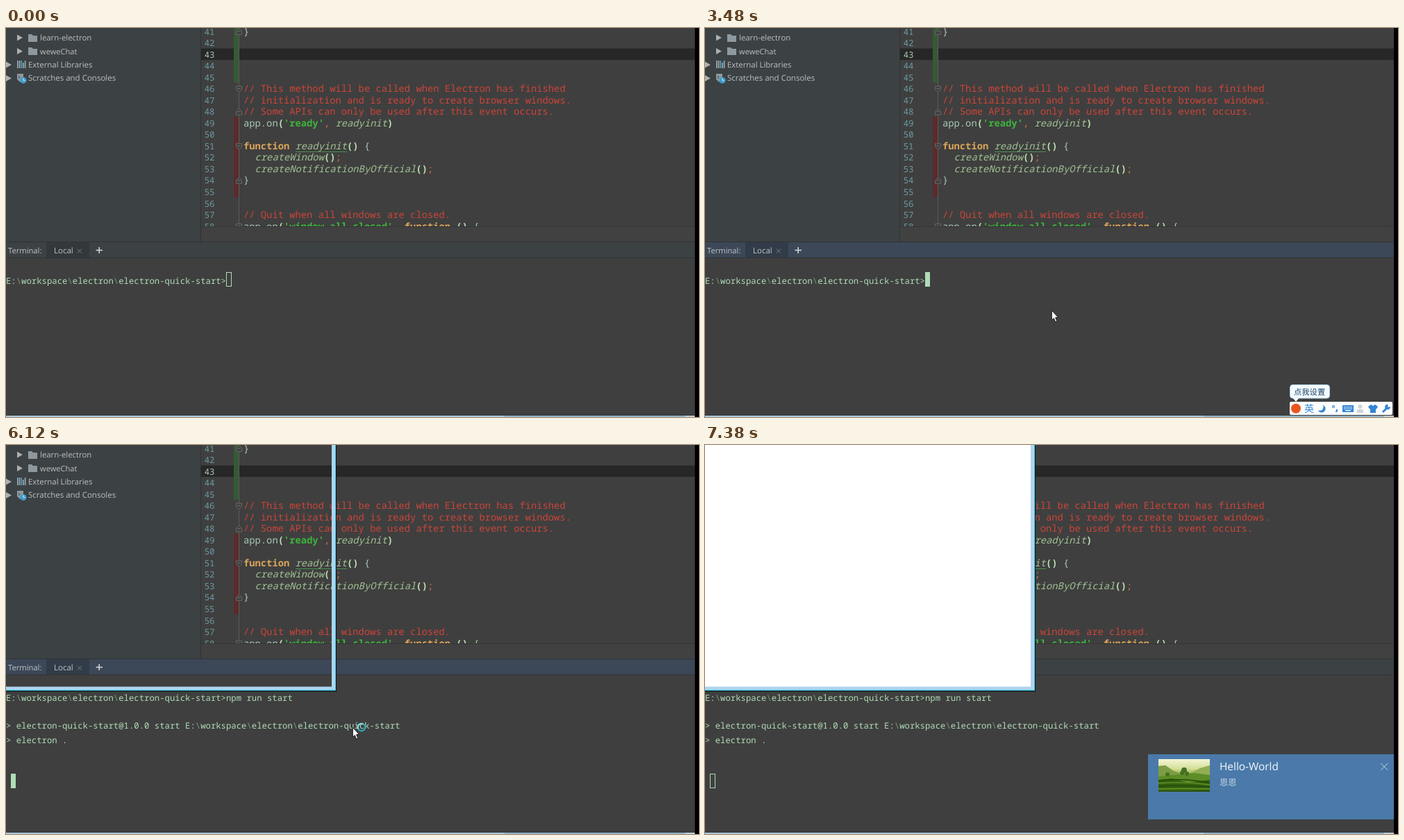
Write an HTML page with a canvas that moves like this. It is 998 by 561 pixels and loops after 8 s.

```html
<!DOCTYPE html>
<html lang="en">
<head>
<meta charset="utf-8">
<title>Editor and terminal</title>
<style>
html, body { margin: 0; width: 100%; height: 100%; overflow: hidden; background: #000; }
canvas { display: block; }
</style>
</head>
<body>
<canvas id="stage" width="998" height="561"></canvas>
<script>
const ctx = document.getElementById('stage').getContext('2d');
ctx.textRendering = 'geometricPrecision';

const LOOP = 8000;
const MONO = '"Noto Sans Mono", "DejaVu Sans Mono", monospace';
const UI = '"Open Sans", "Noto Sans", sans-serif';
const CJK = '"Noto Sans CJK SC", "Noto Sans CJK", sans-serif';
const BG = '#3f3f3f';
const MINT = '#b0dcb6';

const CODE = { adv: 8.28, size: 13.8, x: 342, base: 9.6, row: 16.53 };
const TERM = { adv: 7.372, size: 12.28, top: 352.4, row: 20.3 };

const STYLES = {
  c: ['', '#cc4539'],
  p: ['', '#a9c9b4'],
  b: ['bold', '#bfe3b2'],
  s: ['bold', '#3cb53c'],
  k: ['bold', '#dba55a'],
  i: ['italic', '#a0c293'],
  o: ['', '#cb7441']
};

// Line number -> list of [style, column, text]
const LINES = {
  41: [['p', 0, '}']],
  46: [['c', 0, '// This method will be called when Electron has finished']],
  47: [['c', 0, '// initialization and is ready to create browser windows.']],
  48: [['c', 0, '// Some APIs can only be used after this event occurs.']],
  49: [['p', 0, 'app.on'], ['b', 6, '('], ['s', 7, "'ready'"], ['o', 14, ','], ['i', 16, 'readyinit'], ['b', 25, ')']],
  51: [['k', 0, 'function'], ['i', 9, 'readyinit'], ['b', 18, '()'], ['p', 21, '{']],
  52: [['i', 2, 'createWindow'], ['b', 14, '()'], ['o', 16, ';']],
  53: [['i', 2, 'createNotificationByOfficial'], ['b', 30, '()'], ['o', 32, ';']],
  54: [['p', 0, '}']],
  57: [['c', 0, '// Quit when all windows are closed.']],
  58: [['p', 0, 'app.on'], ['b', 6, '('], ['s', 7, "'window-all-closed'"], ['o', 26, ','], ['k', 28, 'function'], ['b', 37, '()'], ['p', 40, '{']]
};

const PATH = 'E:\\workspace\\electron\\electron-quick-start';
const PROMPT = PATH + '>';

// Time, x, y of the mouse pointer
const POINTER = [
  [1130, 683, 476], [1210, 650, 464], [1290, 619, 454], [1370, 593, 447],
  [1600, 553, 430], [1680, 518, 414], [1760, 499, 407], [7300, 436, 77]
];

// Time, typed command, cursor column, cursor row
const TYPING = [
  [0, '', 43, 0], [2540, 'CLS', 46, 0], [3090, 'cls', 46, 0], [3480, '', 43, 0],
  [3940, 'npm run start', 56, 0], [4720, 'npm run start', 0, 1],
  [5260, 'npm run start', -1, 1], [5730, 'npm run start', 0, 5],
  [5960, 'npm run start', 1, 6]
];

const latest = (list, t) => list.filter(e => e[0] <= t).pop();

function rect(x, y, w, h, color) {
  ctx.fillStyle = color;
  ctx.fillRect(x, y, w, h);
}

function poly(points, color, line) {
  ctx.beginPath();
  points.forEach(([x, y]) => ctx.lineTo(x, y));
  ctx.closePath();
  if (color) { ctx.fillStyle = color; ctx.fill(); }
  if (line) { ctx.strokeStyle = line; ctx.lineWidth = 1; ctx.stroke(); }
}

function disc(x, y, r, color) {
  ctx.fillStyle = color;
  ctx.beginPath();
  ctx.arc(x, y, r, 0, 7);
  ctx.fill();
}

function path(points, color, width = 1) {
  ctx.strokeStyle = color;
  ctx.lineWidth = width;
  ctx.beginPath();
  points.forEach(([x, y], i) => i ? ctx.lineTo(x, y) : ctx.moveTo(x, y));
  ctx.stroke();
}

function cross(x, y, r, color) {
  path([[x - r, y - r], [x + r, y + r]], color);
  path([[x - r, y + r], [x + r, y - r]], color);
}

function label(text, x, y, color, size = 11.4, family = UI) {
  ctx.font = `${size}px ${family}`;
  ctx.fillStyle = color;
  ctx.fillText(text, x, y);
}

function mono(text, x, y, grid, color, style = '') {
  ctx.font = `${style} ${grid.size}px ${MONO}`;
  ctx.fillStyle = color;
  [...text].forEach((ch, i) => {
    ctx.globalAlpha = ch === '\\' ? 0.55 : 1;
    if (ch !== ' ') ctx.fillText(ch, x + i * grid.adv, y);
  });
  ctx.globalAlpha = 1;
}

function folder(x, y) {
  poly([[x, y], [x + 5, y], [x + 7, y + 2], [x + 13, y + 2], [x + 13, y + 11], [x, y + 11]], '#8d999f');
}

function drawSidebar() {
  rect(0, 0, 280, 308, '#3c4143');
  rect(280, 0, 1, 308, '#313335');
  [[16, 14], [16, 33.5], [0, 53], [0, 72.5]].forEach(([x, y]) =>
    poly([[x, y - 4.5], [x + 8, y], [x, y + 4.5]], '#adb0b1'));
  folder(32, 9);
  folder(32, 28);
  ['#9aa7ad', '#9aa7ad', '#47a6c9', '#9aa7ad', '#9aa7ad'].forEach((c, i) =>
    rect(16 + i * 2.7, i === 3 ? 50 : 47, 1.7, i === 3 ? 8 : 11, c));
  poly([[16, 66], [25, 66], [25, 74], [20, 78], [16, 74]], '#8d999f');
  path([[18, 69], [20, 71], [18, 73]], '#3c4143');
  disc(25, 75.5, 4.6, '#3f9dcc');
  path([[25, 72.5], [25, 75.5], [27.5, 75.5]], '#e4f1f7');
  const ink = '#bcc0c1';
  label('learn-electron', 49, 18, ink);
  label('weweChat', 49, 38, ink, 11.1);
  label('External Libraries', 32, 57, ink);
  label('Scratches and Consoles', 32, 76, ink, 11.5);
}

function foldMark(y, down) {
  const s = down ? 1 : -1;
  poly([[331.5, y - 4 * s], [339.5, y - 4 * s], [339.5, y + 1 * s], [335.5, y + 4.5 * s], [331.5, y + 1 * s]], BG, '#686868');
  path([[333.5, y - 0.5], [337.5, y - 0.5]], '#777');
}

function drawEditor() {
  rect(281, 0, 711, 308, BG);
  ctx.save();
  ctx.beginPath();
  ctx.rect(281, 0, 711, 286);
  ctx.clip();
  rect(281, 29.5, 711, 16.5, '#272727');
  rect(328, 0, 7, 79, '#355a35');
  rect(328, 128, 7, 116, '#5c2a2a');
  rect(335, 0, 1, 286, '#5b5b5b');
  [[41, 0], [46, 1], [48, 0], [51, 1], [54, 0], [58, 1]].forEach(([n, down]) =>
    foldMark(5.4 + (n - 41) * CODE.row, down));
  for (let n = 41; n <= 58; n++) {
    const y = CODE.base + (n - 41) * CODE.row;
    mono(String(n), 285.7, y, { adv: 7.4, size: 12.4 }, n === 43 ? '#a9c7ae' : '#6b9ba3');
    (LINES[n] || []).forEach(([key, col, text]) => {
      const [style, color] = STYLES[key];
      mono(text, CODE.x + col * CODE.adv, y, CODE, color, style);
    });
  }
  path([[417, 178.5], [491, 178.5]], '#4a9050');
  ctx.restore();
  rect(281, 286, 711, 1, '#353535');
  rect(281, 287, 711, 21, '#414141');
}

function drawHeader(t) {
  const focused = t >= 1760 && t < 6200;
  const old = t >= 1760 && t < 6360;
  rect(0, 308, 992, 24, focused ? '#3c4757' : '#3c4144');
  if (old) rect(0, 308, 469, 24, '#3c4757');
  rect(58, 309, 62, 22, old ? '#323c48' : '#33383b');
  rect(0, 308, 992, 1, '#303335');
  rect(0, 331, 992, 1, '#303335');
  const ink = '#bfc3c5';
  label('Terminal:', 3, 325, ink, 11.2);
  label('Local', 69, 325, ink, 11.5);
  cross(106, 321.5, 3, '#7b8185');
  path([[129.5, 320.5], [139, 320.5]], '#d0d3d5', 1.6);
  path([[134.2, 316], [134.2, 325]], '#d0d3d5', 1.6);
}

function drawTerminal(t) {
  const [, typed, col, row] = latest(TYPING, t);
  const write = (text, r) => mono(text, 0, TERM.top + r * TERM.row + 16.2, TERM, MINT);
  rect(0, 332, 992, 227, BG);
  write(PROMPT + typed, 0);
  if (t >= 5730) {
    write('> electron-quick-start@1.0.0 start ' + PATH, 2);
    write('> electron .', 3);
  }
  if (col < 0) return;
  const x = Math.round(col * TERM.adv), y = Math.round(TERM.top + row * TERM.row);
  if (t >= 1760 && t < 6200) {
    rect(x, y, 7, 21, MINT);
  } else {
    ctx.strokeStyle = MINT;
    ctx.lineWidth = 1;
    ctx.strokeRect(x + 0.5, y + 0.5, 7, 20);
  }
}

function drawInputBar() {
  const blue = '#3485d4';
  ctx.fillStyle = '#f4faff';
  ctx.strokeStyle = '#a8cbe4';
  ctx.lineWidth = 1;
  ctx.beginPath();
  ctx.roundRect(842.5, 514.5, 57, 19.5, 4);
  ctx.fill();
  ctx.stroke();
  poly([[846, 533], [856, 533], [851, 539]], '#f4faff');
  label('点我设置', 848, 528.5, '#1c4668', 11.3, CJK);
  ctx.fillStyle = '#fbfdff';
  ctx.beginPath();
  ctx.roundRect(842, 539, 148, 19, 2);
  ctx.fill();
  disc(851, 548.7, 7, '#e9551f');
  label('英', 863, 554, blue, 14, CJK);
  // moon
  disc(888, 549, 5.6, blue);
  disc(885.4, 546.6, 5.2, '#fbfdff');
  // punctuation
  ctx.strokeStyle = blue;
  ctx.lineWidth = 1.2;
  ctx.beginPath();
  ctx.arc(905, 546, 1.5, 0, 7);
  ctx.stroke();
  path([[910, 550], [910, 552], [908.5, 554]], blue, 2);
  // keyboard
  rect(918, 544, 16, 10, blue);
  for (let i = 0; i < 10; i++) rect(920 + (i % 5) * 2.6, 546 + (i > 4) * 2.5, 1.4, 1.3, '#fff');
  rect(922, 551, 8, 1.3, '#fff');
  // person
  disc(943.5, 546, 3, '#cfd4d8');
  poly([[938.5, 555], [939.5, 550], [947.5, 550], [948.5, 555]], '#cfd4d8');
  // shirt
  poly([[959, 543], [962, 545], [965, 543], [969, 546], [967, 549.5], [966, 549], [966, 555], [958, 555], [958, 549], [957, 549.5], [955, 546]], blue);
  // wrench
  path([[976, 554], [982.5, 547.5]], blue, 3);
  disc(983, 546.5, 3.8, blue);
  poly([[983, 546.5], [984, 541], [989, 546]], '#fbfdff');
}

function drawWindow(t) {
  if (t >= 6360) rect(0, 0, 469, 349, '#fff');
  rect(469, 0, 5, 353, '#b0d3ee');
  rect(0, 348.5, 474, 5, '#b0d3ee');
  rect(474, 0, 1, 354, '#3fd2ee');
  rect(0, 353, 475, 1.5, '#3fd2ee');
  rect(475, 0, 1, 356, '#101416');
  rect(0, 354.5, 476, 1.2, '#101416');
}

function drawPhoto(x, y) {
  const sky = ctx.createLinearGradient(0, y, 0, y + 47);
  sky.addColorStop(0, '#f4f5d6');
  sky.addColorStop(0.3, '#d3df95');
  sky.addColorStop(0.5, '#7da23d');
  sky.addColorStop(1, '#2f5c10');
  rect(x, y, 74, 47, sky);
  ctx.save();
  ctx.beginPath();
  ctx.rect(x, y, 74, 47);
  ctx.clip();
  const at = pts => pts.map(([a, b]) => [x + a, y + b]);
  poly(at([[0, 10], [10, 9], [22, 17], [34, 22], [0, 27]]), '#7d9c45');
  poly(at([[74, 9], [60, 13], [46, 20], [74, 27]]), '#93ad55');
  poly(at([[0, 25], [30, 22], [52, 20], [74, 23], [74, 36], [0, 34]]), '#5e8c26');
  [[37, 16, 4], [34, 20, 3], [41, 21, 3], [13, 22, 3]].forEach(([a, b, r]) => disc(x + a, y + b, r, '#446f20'));
  poly(at([[0, 30], [20, 28], [42, 34], [74, 30], [74, 47], [0, 47]]), '#34620f');
  for (let i = 0; i < 6; i++) {
    ctx.strokeStyle = i % 2 ? '#66952b' : '#24490b';
    ctx.lineWidth = 1.5;
    ctx.beginPath();
    ctx.moveTo(x, y + 31 + i * 4);
    ctx.quadraticCurveTo(x + 32, y + 27 + i * 5, x + 74, y + 34 + i * 3);
    ctx.stroke();
  }
  ctx.restore();
}

function drawToast(t) {
  const step = Math.floor((t - 6280) / 80);
  const x = 638 + (t < 6680 ? Math.max(1, Math.round(23 * Math.pow(0.305, step))) : 0);
  rect(x, 446, 992 - x, 94, '#4a79aa');
  drawPhoto(x + 15, 453);
  label('Hello-World', x + 103, 469, '#f7fafc', 15.4);
  label('恩恩', x + 103, 490.5, '#c5d4e3', 12.3, CJK);
  cross(x + 340.3, 464, 5, '#c3d4e5');
}

function drawPointer(t) {
  const at = latest(POINTER, t);
  if (!at || t >= 7380) return;
  const [, x, y] = at;
  const shape = [[0, 0], [0, 14], [3, 11.2], [5.3, 16.5], [7.6, 15.5], [5.3, 10.3], [9.2, 10]];
  poly(shape.map(([a, b]) => [x + a + 0.3, y + b + 0.3]), '#fff', '#16181a');
  if (t >= 6120 && t < 6280) {
    ctx.lineWidth = 2.6;
    ctx.strokeStyle = '#2f9fae';
    ctx.beginPath();
    ctx.arc(512, 407, 5.2, 0, 7);
    ctx.stroke();
    ctx.lineWidth = 1.6;
    ctx.strokeStyle = '#a5e2e8';
    ctx.beginPath();
    ctx.arc(512, 407, 5.2, 2.6, 5.2);
    ctx.stroke();
  }
}

function drawEdges() {
  rect(0, 558.5, 992, 0.5, '#2c3236');
  rect(0, 559, 718, 2, '#a9c8da');
  rect(718, 559, 260, 2, '#91b3c6');
  rect(978, 559, 14, 2, '#c3cdd2');
  rect(992, 0, 6, 561, '#000');
}

function draw(t) {
  drawSidebar();
  drawEditor();
  drawTerminal(t);
  drawHeader(t);
  if (t >= 1840 && t < 6120) drawInputBar();
  if (t >= 6120) drawWindow(t);
  if (t >= 6200) drawToast(t);
  drawPointer(t);
  drawEdges();
}

const start = performance.now();
function tick() {
  draw((performance.now() - start) % LOOP);
  requestAnimationFrame(tick);
}
tick();
</script>
</body>
</html>
```
